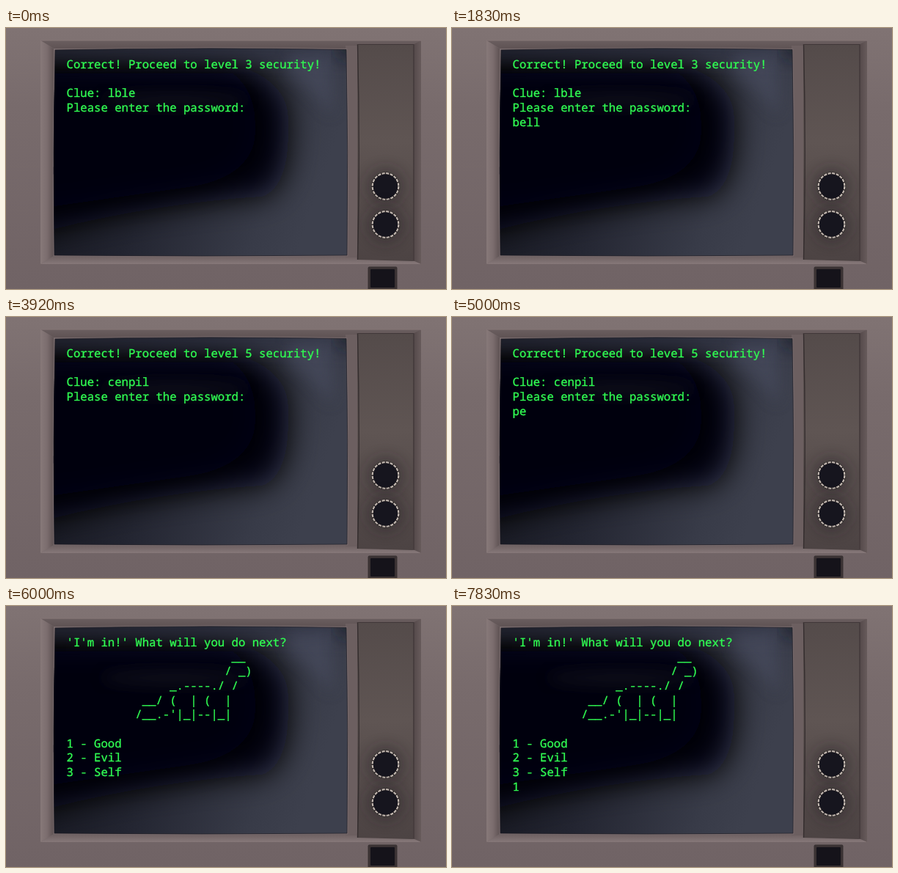
Recreate the animation shown at these times as an HTML page. Size 600x356 px, loop 8 s.

```html
<!DOCTYPE html>
<html lang="en">
<head>
<meta charset="utf-8">
<title>Terminal</title>
<style>
  html, body { margin: 0; width: 100%; height: 100%; overflow: hidden; background: #74676a; }
  svg { position: absolute; left: 0; top: 0; display: block; }
  pre {
    position: absolute; left: 82.6px; top: 40.1px; margin: 0;
    font: 15.63px/19.64px "Noto Sans Mono", "DejaVu Sans Mono", monospace;
    color: #30fb52; -webkit-text-stroke: .35px #30fb52;
    text-rendering: geometricPrecision; font-variant-ligatures: none;
  }
</style>
</head>
<body>
<svg width="600" height="356" viewBox="0 0 600 356">
  <defs>
    <linearGradient id="body" x2="0" y2="1">
      <stop offset="0" stop-color="#807373"/>
      <stop offset=".3" stop-color="#786b6c"/>
      <stop offset="1" stop-color="#706365"/>
    </linearGradient>
    <linearGradient id="left">
      <stop offset="0" stop-color="#877979"/>
      <stop offset=".5" stop-color="#7b6d6e"/>
      <stop offset="1" stop-color="#5e5253"/>
    </linearGradient>
    <linearGradient id="top" x2="0" y2="1">
      <stop offset="0" stop-color="#6a5e5f"/>
      <stop offset="1" stop-color="#5f5354"/>
    </linearGradient>
    <linearGradient id="bottom" x2="0" y2="1">
      <stop offset="0" stop-color="#6c5f60"/>
      <stop offset="1" stop-color="#867879"/>
    </linearGradient>
    <linearGradient id="right">
      <stop offset="0" stop-color="#524748"/>
      <stop offset="1" stop-color="#675b5b"/>
    </linearGradient>
    <linearGradient id="panel" x2="0" y2="1">
      <stop offset="0" stop-color="#544b4a"/>
      <stop offset=".45" stop-color="#5f5553"/>
      <stop offset="1" stop-color="#4c4343"/>
    </linearGradient>
    <linearGradient id="glass" x2="1" y2=".25">
      <stop offset="0" stop-color="#11121a"/>
      <stop offset=".45" stop-color="#222430"/>
      <stop offset=".85" stop-color="#383b48"/>
      <stop offset="1" stop-color="#3d404d"/>
    </linearGradient>
    <filter id="soft" x="-30%" y="-30%" width="160%" height="160%"><feGaussianBlur stdDeviation="20"/></filter>
    <filter id="haze" x="-30%" y="-60%" width="160%" height="220%"><feGaussianBlur stdDeviation="10"/></filter>
    <path id="glassShape" d="M67 30Q265 26 464 29.5Q467 170 465 310Q265 312 66 310Q63.5 170 67 30Z"/>
    <clipPath id="tube"><use href="#glassShape"/></clipPath>
    <g id="knob">
      <circle r="24" fill="#241e20" opacity=".45" filter="url(#haze)"/>
      <circle r="19.5" fill="#2b2527"/>
      <circle r="17.8" fill="none" stroke="#c2b8b0" stroke-width="2.2" stroke-dasharray="4.1 1.5"/>
      <circle r="16.6" fill="#16151e"/>
    </g>
  </defs>

  <rect width="600" height="356" fill="url(#body)"/>

  <!-- recessed frame -->
  <path d="M47 17H566L555 28H65Z" fill="url(#top)"/>
  <path d="M47 17L65 28V311L47 322Z" fill="url(#left)"/>
  <path d="M47 322L65 311H555L566 322Z" fill="url(#bottom)"/>
  <path d="M566 17L555 23V317L566 322Z" fill="url(#right)"/>
  <path d="M47 17H566" fill="none" stroke="#857777" stroke-width="1"/>
  <rect x="463" y="24" width="17" height="289" fill="#6c5f60"/>
  <path d="M479 22H555V318L479 316Z" fill="url(#panel)"/>
  <path d="M479.5 22Q483 170 479.5 316" fill="none" stroke="#352e2f" stroke-width="1.4"/>
  <path d="M479 22.5H556V318" fill="none" stroke="#403738" stroke-width="1.2"/>

  <!-- screen -->
  <use href="#glassShape" fill="none" stroke="#75686a" stroke-width="3"/>
  <g clip-path="url(#tube)">
    <rect x="60" y="24" width="410" height="292" fill="url(#glass)"/>
    <path d="M20 58L330 56Q388 80 385 130Q388 215 350 230Q190 240 20 286Z" fill="#050509" filter="url(#soft)"/>
    <path d="M20 62H310Q345 90 340 150Q330 205 250 217L20 250Z" fill="#050509" filter="url(#soft)"/>
    <path d="M50 12H480V50Q300 42 50 46Z" fill="#34374a" opacity=".45" filter="url(#haze)"/>
    <ellipse cx="230" cy="98" rx="100" ry="10" fill="#20222c" opacity=".45" filter="url(#haze)"/>
    <path d="M385 36H445V120Q415 80 385 62Z" fill="#4c5064" opacity=".55" filter="url(#haze)"/>
    <circle cx="466" cy="29" r="14" fill="#181a24" opacity=".6" filter="url(#haze)"/>
  </g>
  <use href="#glassShape" fill="none" stroke="#1b1a20" stroke-opacity=".6"/>

  <use href="#knob" x="517.5" y="216"/>
  <use href="#knob" x="517.5" y="268"/>
  <rect x="493.5" y="325.5" width="40" height="32" rx="2" fill="#3a3233"/>
  <rect x="497" y="329" width="33" height="25" rx="1" fill="#15131a"/>
</svg>
<pre id="screen"></pre>

<script>
const LOOP = 8000;

const level = (n, clue) =>
  `Correct! Proceed to level ${n} security!\n\nClue: ${clue}\nPlease enter the password:\n`;

const menu = String.raw`'I'm in!' What will you do next?
                        __
                       / _)
               _.----./ /
           __/ (  | (  |
          /__.-'|_|--|_|

1 - Good
2 - Evil
3 - Self
`;

// Each scene: start time, fixed text, typed word and the time of each key press.
const scenes = [
  { start: 0, text: level(3, "lble"), word: "bell", keys: [1080, 1170, 1420, 1580] },
  { start: 1920, text: level(4, "boko"), word: "book", keys: [3000, 3170, 3420, 3580] },
  { start: 3750, text: level(5, "cenpil"), word: "pencil", keys: [4920, 5000, 5080, 5250, 5420, 5580] },
  { start: 6000, text: menu, word: "1", keys: [7670] }
];

const screen = document.getElementById("screen");
const cursorOn = t => t % 1000 >= 330 && t % 1000 < 830;

function render(t) {
  const scene = scenes.filter(s => s.start <= t).pop();
  const count = scene.keys.filter(k => k <= t).length;
  const text = scene.text + scene.word.slice(0, count) + (cursorOn(t) ? "_" : "");
  if (screen.textContent !== text) screen.textContent = text;
}

function tick() {
  render(performance.now() % LOOP);
  requestAnimationFrame(tick);
}
tick();
</script>
</body>
</html>
```
